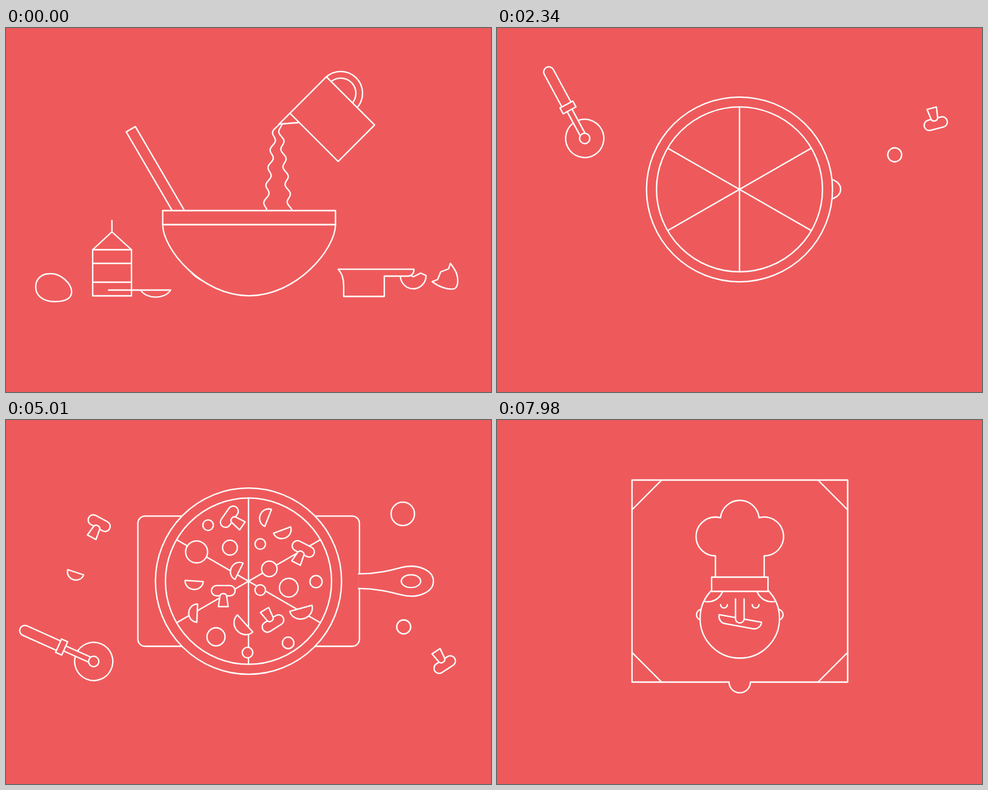
An HTML page with a canvas for the animation above (8 s loop, 800x600 px).

```html
<!DOCTYPE html>
<html lang="en">
<head>
<meta charset="utf-8">
<title>Pizza</title>
<style>
html, body { margin: 0; width: 100%; height: 100%; overflow: hidden; background: #ee5a5b; }
canvas { display: block; }
</style>
</head>
<body>
<canvas id="stage" width="800" height="600"></canvas>
<script>
const ctx = document.getElementById('stage').getContext('2d');
const BG = '#ee5a5b', LOOP = 8000, TAU = Math.PI * 2;
const CX = 400.5, CY = 265.7;

const clamp = v => Math.min(1, Math.max(0, v));
const span = (t, a, b) => clamp((t - a) / (b - a));
const mix = (a, b, k) => a + (b - a) * k;
const smooth = k => k * k * (3 - 2 * k);
const easeOut = k => 1 - (1 - k) ** 3;
const rad = deg => deg * Math.PI / 180;

// Strokes keep their width whatever the current transform is.
function ink(shape, filled = true) {
  const p = new Path2D();
  p.addPath(typeof shape === 'string' ? new Path2D(shape) : shape, ctx.getTransform());
  ctx.save();
  ctx.resetTransform();
  if (filled) ctx.fill(p);
  ctx.stroke(p);
  ctx.restore();
}

function at(x, y, deg, sx, sy, draw) {
  ctx.save();
  ctx.translate(x, y);
  ctx.rotate(rad(deg));
  ctx.scale(sx, sy);
  draw();
  ctx.restore();
}

const move = (x, y, draw) => at(x, y, 0, 1, 1, draw);

// Draws a left part and its mirror image about the line x = cx.
function mirrored(cx, draw) {
  for (const s of [1, -1]) at(cx, 0, 0, s, 1, draw);
}

function oval(x, y, rx, ry = rx) {
  const p = new Path2D();
  p.ellipse(x, y, rx, ry, 0, 0, TAU);
  ink(p);
}

function box(x1, y1, x2, y2, r = 0) {
  const p = new Path2D();
  p.roundRect(x1, y1, x2 - x1, y2 - y1, r);
  ink(p);
}

// --- Mixing -------------------------------------------------------------

// Drawn upright around its centre; the mouth is the top edge.
function jug(t) {
  const p = smooth(span(t, 150, 810)), out = Math.max(0, (t - 810) / 350);
  if (out > 1.2) return;
  at(538, 150 - 76 * p - 250 * out * out, 45 * (p - 1), 1, 1, () => {
    oval(40, -20, 36);
    oval(40, -20, 25);
    ink('M-42 -56H-68L-28 -22Z');
    box(-42.5, -56, 42.5, 56.5);
  });
}

function stream(t) {
  const top = 158 + 142 * Math.max(0, (t - 170) / 280) ** 2;
  if (top > 298) return;
  for (const side of [-1, 1]) {
    const p = new Path2D();
    for (let y = top; y <= 301; y++) {
      const wave = Math.cos(TAU * (y - 171.5 - t * 0.12) / 29);
      const lip = side < 0 ? 4 * Math.exp((158 - y) / 7) : 0;
      p.lineTo(448 + side * (4 + 0.12 * (y - 160)) - 3.4 * wave + lip, y);
    }
    ink(p, false);
  }
}

function spoon(t) {
  const k = Math.max(0, (t - 1130) / 400) ** 2, near = Math.min(1, k);
  const stir = -12 - 21.5 * Math.cos(TAU * t / 800 - 0.55);
  at(mix(327, 296.5, near), mix(374, 96.2, k), mix(stir, -6, near), 1, 1, () =>
    ink('M-8.7 -47V-240H8.7V-47A34.7 48.6 0 1 1 -8.7 -47Z'));
}

function bowl() {
  ink('M258.5 324C258.5 364 322 441.3 401 441.3S543.5 364 543.5 324Z');
  box(258.5, 301, 543.5, 324);
}

function carton() {
  box(143, 365.5, 207, 441.5);
  ink('M143 388H207M143 419H207M143 365.5L174.7 336L207 365.5M174.7 336V317.5', false);
}

const egg = () => ink('M72 405C89 404 108 420 108.3 435C108 447 97 451 80 451C60 451 49 440 49 427C49 414 58 405 72 405Z');
const teaspoon = () => ink('M169 432H271.5C262 447.5 232 447.5 222 432', false);
const shell = () => ink('M650.5 408.5A21 21.5 0 0 0 692.8 408L684 404L672 410L666 407Z');
const shard = () => ink('M733 388L730 397L717 402L712 414.5L703 418C714 427 730 432 739 430C747 427 746 412 743 404Q740 397 733 388Z');
const cup = () => ink('M549 397.7H674C674 404 670 409 664 409H625V442.5H558V424C558 412 554 403 549 397.7Z');

function mixing(t) {
  const drop = i => 340 * Math.max(0, (t - 1640 - 15 * i) / 380) ** 2;
  [carton, teaspoon, egg, shell, shard].forEach((draw, i) => move(0, drop(i + 1), draw));
  move(span(t, 0, 300) - 1, drop(2), cup);
  jug(t);
  spoon(t);
  stream(t);
  move(0, drop(0), bowl);
}

// --- Pizza --------------------------------------------------------------

function mushroom() {
  box(-19.5, -8.5, 19.5, 8.5, 8.5);
  ink('M-8 26.3L-5.6 9A5.7 5.2 0 0 1 5.6 9L8 26.3Z');
}

function half(r) {
  ink(`M${-r} 0H${r}A${r} ${r * 0.93} 0 0 1 ${-r} 0Z`);
}

// Resting places, in the order of landing.
const rounds = [
  [314, 217], [466, 276], [434, 245], [511, 266], [398, 383], [419, 280],
  [419, 204], [333, 173], [465, 367], [369, 210], [346, 357]
];
const caps = [[358, 281, 0], [440, 335, 148], [368, 159, -55], [490, 212, 27]];
const halves = [[384, 249], [432, 161], [315, 318], [394, 335], [310, 265], [486, 310], [455, 181]];

// Throws each piece from one hand, one after another; it shrinks and turns as it falls.
function toss(t, list, from, first, gap, flight, draw) {
  list.forEach(([x, y, deg = 0], i) => {
    const u = clamp((first + gap * i - t) / flight);
    if (u === 1) return;
    const far = u ** 4, s = 1 + 1.7 * u * u;
    at(mix(x, from[0], far) + 0.4, mix(y, from[1], far) + 0.4, deg + 110 * u * u, s, s, () => draw(i));
  });
}

function toppings(t) {
  toss(t, rounds, [400, -50], 3180, 60, 800, i => oval(0, 0, Math.max(8.7, 3 + 2.7 * Math.abs(i - 5.6))));
  toss(t, caps, [400, -75], 3960, 60, 550, mushroom);
  toss(t, halves, [503, 58], 4710, 50, 430, i =>
    at(0, 0, 48 - 70 * Math.tanh(0.75 * (i - 3)), 1, 1, () => half(i > 2 && i % 2 ? 19 : 15)));
}

function pizza(t) {
  const k = easeOut(span(t, 1700, 2500));
  at(400, mix(312, CY, k), 0, mix(0.93, 1, k), k, () => {
    oval(0, 0, 153.5);
    oval(0, 0, 137);
    for (let i = 0; i < 3; i++) at(0, 0, 60 * i, 1, 1, () => ink('M0 -137V137', false));
  });
  toppings(t);
}

function board(t) {
  const k = 1 - (1 - span(t, 2180, 2800)) ** 2;
  const s = mix(0.52, 1, k), out = span(t, 5490, 6100);
  at(400 + 640 * out * out, CY, 0, s, s, () => {
    box(-182.5, -107.3, 183, 107.3, 12);
    const x = 183 - 142 * (1 - k);
    ink(`M181.5 -12C${x + 29} -12 ${x + 52} -18 ${x + 69} -22.5C${x + 96} -29.5 ${x + 122} -18 ${x + 122} 0`
      + `S${x + 96} 29.5 ${x + 69} 22.5C${x + 52} 18 ${x + 29} 12 181.5 12`);
    oval(x + 85, 0, 16, 10.5);
  });
}

function cutter() {
  oval(0, 0, 31.5);
  box(-56, -4.5, -4, 4.5);
  box(-133, -8.5, -60, 8.5, [8.5, 0, 0, 8.5]);
  box(-63.5, -12, -52.5, 12);
  oval(0, 0, 8.5);
}

// Loose pieces around the board, in the order in which they fall in.
const loose = [
  [656, 341, 0, () => oval(0, 0, 11.5)],
  [723.7, 403.2, 147, mushroom],
  [115, 251, 18, () => half(13.7)],
  [153.7, 170, 28, mushroom],
  [654.5, 154.7, 0, () => oval(0, 0, 19.3)]
];

function sides(t) {
  const since = t - 2340;
  const leave = (x, i) => Math.sign(x - 400) * 260 * span(t, 5480 + 30 * i, 5930 + 30 * i) ** 2;
  loose.forEach(([x, y, deg, draw], i) => {
    const above = 132 * 1.86 ** i * Math.exp(-since / 150);
    at(x + leave(x, i), y - above, deg + 0.075 * above, 1, 1, draw);
  });
  at(144.7 + leave(0, 0), 398 - 216 * Math.exp(-since / 279), 24.1 + 37.5 * Math.exp(-since / 388), 1, 1, cutter);
}

// --- Box ----------------------------------------------------------------

const LEFT = 224, RIGHT = 578, TOP = 100, BOTTOM = 431.3, WALL = 48;

const flap = (t, start) => WALL * Math.cos(Math.PI / 2 * smooth(span(t, start, start + 230)));

function tray(t) {
  move(0, -520 * (1 - easeOut(span(t, 5720, 6240))), () => {
    box(LEFT, BOTTOM, RIGHT, BOTTOM + flap(t, 6290));
    box(LEFT - flap(t, 6190), TOP, RIGHT + flap(t, 6250), BOTTOM);
    box(LEFT, TOP, RIGHT, BOTTOM);
    if (t < 6400) box(LEFT, TOP - WALL - 333, RIGHT, TOP - WALL);
    if (t < 6400) box(LEFT, TOP - WALL, RIGHT, TOP);
  });
}

function hat() {
  const p = new Path2D(), puff = (x, y, a, b) => p.arc(x, y, 32, rad(a), rad(b));
  p.moveTo(CX - 40.2, 259);
  puff(CX - 40.2, 192, 90, 285);
  puff(CX, 164.5, 186, 354);
  puff(CX + 40.2, 192, 255, 450);
  p.lineTo(CX + 40.2, 259);
  ink(p);
  box(CX - 46.5, 259, CX + 46.5, 282.5);
}

function face(t) {
  mirrored(CX, () => oval(-62.2, 321, 9.2));
  oval(CX, 327, 65.5);
  mirrored(CX, () => {
    ink('M-28.5 283C-33.5 295 -45.5 302 -58.5 299', false);
    ink('M-31.7 304.3A5.6 5.6 0 0 0 -20.5 304.3', false);
  });
  hat();
  const tilt = -10.2 * Math.sin(TAU * Math.max(0, t - 7620) / 480);
  at(CX, 332.5, tilt, 1, 1, () => box(-35.5, -5.5, 35.5, 7.5, [0, 0, 12, 12]));
  ink('M393.4 295V327.5A7.1 7.1 0 0 0 407.6 327.5V295');
}

function lid(t) {
  if (t < 6400) return;
  const turn = -Math.cos(Math.PI * smooth(span(t, 6400, 7230)));
  const hinge = mix(TOP - WALL, 99, smooth(span(t, 6440, 6800)));
  if (turn < 0) box(LEFT, hinge, RIGHT, TOP);
  at(0, hinge, 0, 1, turn, () => {
    ctx.translate(0, -99);
    ink('M222.7 99H578.3V432H418A17.6 17.6 0 0 1 382.8 432H222.7Z');
    if (turn <= 0) return;
    mirrored(CX, () => ink('M-177.8 148L-129 99M-177.8 383.2L-129 432', false));
    face(t);
  });
}

function frame(now) {
  const t = now % LOOP;
  ctx.resetTransform();
  ctx.fillStyle = BG;
  ctx.fillRect(0, 0, 800, 600);
  ctx.strokeStyle = '#fff';
  ctx.lineWidth = 2.3;
  ctx.lineCap = ctx.lineJoin = 'round';
  if (t < 2200) mixing(t);
  if (t > 1900 && t < 6100) sides(t);
  if (t > 2180 && t < 6100) board(t);
  if (t > 5720) tray(t);
  if (t > 1700) pizza(t);
  lid(t);
}

let start;
function tick(now) {
  start ??= now;
  frame(now - start);
  requestAnimationFrame(tick);
}
frame(0);
requestAnimationFrame(tick);
</script>
</body>
</html>
```
